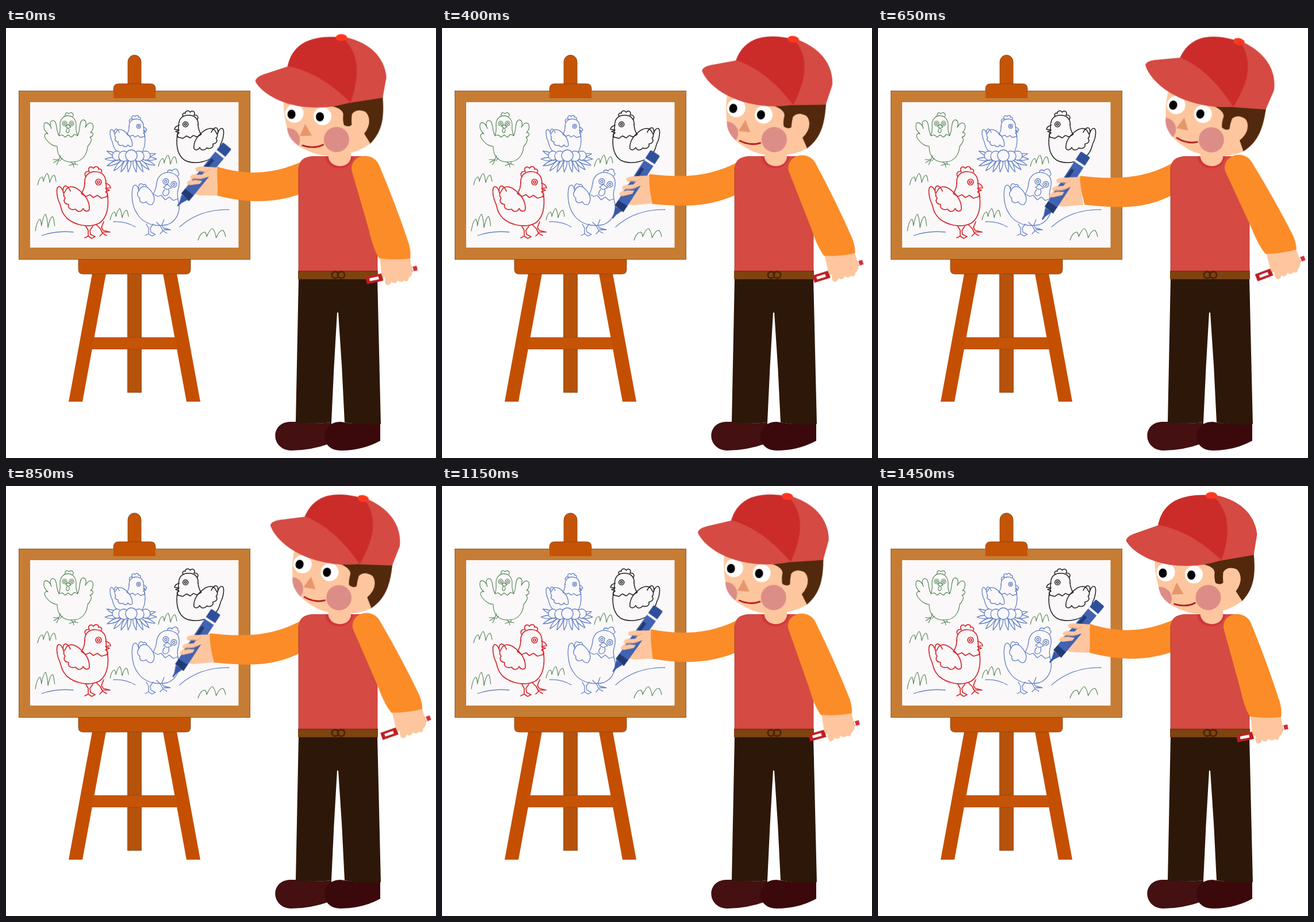
An HTML page without scripts for the animation above (1500 ms loop, 748x748 px).

```html
<!DOCTYPE html>
<html lang="en">
<head>
<meta charset="utf-8">
<title>Painter at the easel</title>
<style>
html, body { margin: 0; height: 100%; overflow: hidden; background: #fff; }
svg { display: block; width: 100%; height: 100%; }

/* All parts share one back-and-forth beat of fifteen even steps each way. */
.swing, .drawing-hand, .sleeve { animation: swing 1.5s steps(15) -50ms infinite; }
.head { --turn: 15deg; transform-origin: 575px 216px; }
.resting-arm { --turn: -10deg; transform-origin: 612px 230px; }
/* The drawing arm follows an arc: nine steps down, then six steps across. */
.drawing-hand { animation-name: draw; transform-origin: 298px 307px; }
.sleeve { animation-name: reach; }

@keyframes swing {
  0%, 100% { transform: rotate(0deg); }
  50% { transform: rotate(var(--turn)); }
}
@keyframes draw {
  0%, 100% { transform: translate(0px, 0px) rotate(0deg); animation-timing-function: steps(9); }
  30% { transform: translate(-2px, 24px) rotate(-7deg); animation-timing-function: steps(6); }
  50% { transform: translate(-15px, 26.5px) rotate(-6.5deg); animation-timing-function: steps(6); }
  70% { transform: translate(-2px, 24px) rotate(-7deg); animation-timing-function: steps(9); }
}
@keyframes reach {
  0%, 100% {
    d: path("M369 240C420 256 465 255 520 230L520 286C470 304 425 305 368 290C370 272 367 258 369 240Z");
    animation-timing-function: steps(9);
  }
  30%, 70% { d: path("M361 254C410 260 465 262 520 230L520 286C470 311 425 312 366 306C363 290 359 272 361 254Z"); }
  30%, 50% { animation-timing-function: steps(6); }
  50% { d: path("M349 258C405 264 465 266 520 230L520 286C470 316 425 315 358 308C354 292 349 276 349 258Z"); }
  70% { animation-timing-function: steps(9); }
}

.line { fill: none; stroke-width: 1.3; stroke-linecap: round; stroke-linejoin: round; }
.line *, #hen *, #tuft, #straw { vector-effect: non-scaling-stroke; }
.green { stroke: #4e8150; stroke-width: 1.1; }
.blue { stroke: #6481c3; }
.red { stroke: #d32b31; stroke-width: 1.7; }
.black { stroke: #222; stroke-width: 1.5; }
.skin { fill: #fdc69e; }
.cloth { fill: #d54a43; }
.orange { fill: #fb8c28; }
.wood { fill: #c55407; }
.edge { stroke: #7d4312; stroke-width: .8; }
</style>
</head>
<body>
<svg viewBox="0 0 748 748">
  <defs>
    <g id="hen">
      <path d="M137 270C136 256 145 249 157 250C169 251 174 259 174 271Q174 282 177 293C179 315 175 330 163 339C145 349 120 343 106 331C94 319 97 310 92 302C89 295 87 281 90 277C94 273 99 281 100 287C98 279 101 273 105 275Q110 278 112 284"/>
      <path d="M137 268Q137 280 131 288L139 293L146 290L152 295L159 291L166 296L177 293"/>
      <path d="M103 284C107 274 116 275 123 279C136 288 146 301 145 316C142 321 136 318 134 314C131 321 124 320 121 315C113 318 107 313 109 307C102 306 99 301 103 296C99 292 100 287 103 284"/>
      <path d="M139 259C135 253 139 248 145 250C141 243 148 239 152 244C155 239 162 241 161 246C166 244 168 249 165 252"/>
      <path d="M173 270Q181 272 182 278L173 279M174 280L180 282L173 285Q180 289 175 293"/>
      <circle cx="161" cy="268" r="5"/><circle cx="161" cy="268" r="2"/>
    </g>
    <g id="feet">
      <path d="M139 345L143 352V362L137 365M143 362L149 366L155 363L147 359L146 352L151 345M157 342L164 349L168 357L163 362M168 357L175 361M169 355L181 355L169 352L166 347L170 337"/>
    </g>
    <path id="tuft" d="M0 20Q3 6 8 6Q10 9 10 14Q14 0 17 0Q20 5 21 16Q25 2 29 3Q31 6 32 14"/>
    <path id="straw" d="M0 0Q10 -6 26 0Q10 6 0 0Z"/>
    <clipPath id="face-clip"><use href="#face"/></clipPath>
  </defs>

  <g id="easel">
    <path fill="#c44f00" d="M150 427H174L133 650H109ZM273 427H297L338 650H314Z"/>
    <rect class="edge" x="211.500" y="427" width="24" height="207" fill="#b5530d"/>
    <path class="wood" d="M153 538H294L298 559H149Z"/>
    <path d="M212 538H236M212 559H236" stroke="#9d4710"/>
    <path class="wood edge" d="M126 402H321V420Q321 428 313 428H134Q126 428 126 420Z"/>
    <path class="wood edge" d="M212 110V59A11.500 12 0 0 1 235 59V110Z"/>
    <rect class="edge" x="22.500" y="109.500" width="402" height="293" fill="#c77c33"/>
    <path class="wood" d="M187 122V106Q187 97 196 97H251Q260 97 260 106V122Z"/>
    <path class="edge" fill="none" d="M187 109V106Q187 97 196 97H251Q260 97 260 106V109"/>
    <rect x="42" y="129" width="362.500" height="253" fill="#fbf8f9"/>
  </g>

  <g class="line green">
    <path d="M93 188C86 180 90 162 82 161C76 161 76 168 79 175C75 163 66 162 66 169C65 176 69 181 73 184C66 182 66 189 70 194C77 203 82 205 89 206C89 224 99 234 116 233C133 233 141 220 142 206C147 201 151 193 146 190C153 188 153 181 147 182C153 176 153 166 147 165C142 165 141 169 138 173C141 164 138 159 133 160C126 164 130 180 124 188"/>
    <path d="M92 187Q95 180 94 168C94 148 121 147 122 168Q121 181 125 187L119 185L114 190L108 186L103 190L98 186Z"/>
    <path d="M103 153C102 147 107 146 109 149C115 145 119 150 116 154M104 171L108 168L113 172L108 175ZM106 175C102 184 111 185 110 176"/>
    <circle cx="102" cy="166" r="4"/><circle cx="102" cy="166" r="1.700"/>
    <circle cx="114" cy="166" r="4"/><circle cx="114" cy="166" r="1.700"/>
    <path d="M95 222L92 229L82 229M92 229L83 234M92 230L88 238M98 226L94 231M113 233L117 237L110 239M117 237L118 242M117 236L125 238M120 233V237"/>
    <use href="#tuft" x="55" y="253"/>
    <use href="#tuft" x="265" y="221"/>
    <use href="#tuft" transform="translate(51 324)scale(1.050 1.450)"/>
    <use href="#tuft" x="181" y="314"/>
    <use href="#tuft" transform="translate(334 349)scale(1.500 1)"/>
  </g>

  <g class="line blue">
    <use href="#hen" transform="matrix(.684 0 0 .7 120.500 -16.700)"/>
    <g fill="#fbf8f9">
      <use href="#straw" transform="translate(199 225)rotate(205)"/>
      <use href="#straw" transform="translate(198 228)rotate(180)"/>
      <use href="#straw" transform="translate(200 230)rotate(158)"/>
      <use href="#straw" transform="translate(205 229)rotate(132)"/>
      <use href="#straw" transform="translate(211 227)rotate(115)"/>
      <use href="#straw" transform="translate(216 225)rotate(98)"/>
      <use href="#straw" transform="translate(222 225)rotate(80)"/>
      <use href="#straw" transform="translate(227 227)rotate(64)"/>
      <use href="#straw" transform="translate(231 228)rotate(46)"/>
      <use href="#straw" transform="translate(235 229)rotate(22)"/>
      <use href="#straw" transform="translate(236 227)rotate(2)"/>
      <use href="#straw" transform="translate(235 225)rotate(-14)"/>
      <circle cx="193" cy="222" r="8"/><circle cx="243" cy="222" r="8"/>
      <circle cx="205" cy="223" r="9"/><circle cx="231" cy="223" r="9"/>
      <circle cx="218" cy="222" r="10"/>
    </g>
    <path d="M62 361Q88 352 117 355M187 337Q208 336 225 346M302 346Q337 315 388 316"/>
    <path d="M262 270C264 255 276 249 288 252C302 256 303 267 300 279Q296 290 301 306C303 324 294 337 281 342C259 347 238 340 228 323C218 309 218 285 221 276C226 269 230 277 231 283C229 272 234 268 239 273Q243 270 245 276"/>
    <path d="M262 270Q261 281 256 289L264 293L270 291L277 299L284 294L291 300L299 297"/>
    <path d="M231 283C235 274 243 274 248 279C258 288 261 300 254 307C247 309 245 304 244 302C237 307 231 302 233 296C227 292 228 287 231 283"/>
    <path d="M281 251C281 245 288 247 289 249C292 243 300 245 299 251Q303 253 299 257M274 277L281 272L288 278L280 281ZM276 281C269 289 275 294 280 291Q285 288 283 281"/>
    <circle cx="278" cy="267" r="5"/><circle cx="278" cy="267" r="2"/>
    <circle cx="292" cy="272" r="5"/><circle cx="292" cy="272" r="2"/>
    <use href="#feet" transform="translate(105 -4)"/>
  </g>
  <g class="line black"><use href="#hen" transform="matrix(-.916 0 0 .875 459.700 -66.900)"/></g>
  <g class="line red"><use href="#hen"/><use href="#feet"/></g>

  <g class="drawing-hand">
    <path class="skin" d="M372 240L345 239Q328 239 331 245L346 249L325 253Q318 257 324 260L318 264Q312 269 321 271L336 272L326 281Q325 287 338 289L372 290Z"/>
    <g transform="translate(386 203)rotate(130)">
      <path fill="#4262b2" d="M2 -10H106V9H2Q0 9 0 7V-8Q0 -10 2 -10Z"/>
      <path fill="#304f9b" d="M2 -10H17V9H2Q0 9 0 7V-8Q0 -10 2 -10Z"/>
      <path fill="#fff" d="M17 -10H21V9H17Z"/>
      <path fill="#233b75" d="M34 1H58V7H34ZM104 -10H117L115 9H104Z"/>
      <path fill="#3558a8" d="M116 -7L128 -2L136 -1V1L128 2L116 7Z"/>
    </g>
    <path class="skin" d="M370 241L345 239Q328 238 331 245L347 248L342 253L326 253Q319 256 324 259L339 260L353 257Q363 253 370 247Z"/>
    <path class="skin" d="M318 264Q312 269 321 271L338 269L342 264L330 262Z"/>
    <path d="M332 246L347 249L356 244M324 260L340 261L349 258" fill="none" stroke="#e9a27c" stroke-width="1"/>
  </g>
  <path class="sleeve orange" d="M369 240C420 256 465 255 520 230L520 286C470 304 425 305 368 290C370 272 367 258 369 240Z"/>

  <g id="body">
    <path fill="#441011" d="M506 685Q535 690 566 686V722Q530 735 496 735C460 734 459 686 494 685Z"/>
    <path fill="#3b090b" d="M582 685Q620 692 651 687V718Q620 735 582 735C544 735 545 685 582 685Z"/>
    <path fill="#2d1708" d="M509 436H646L652 689Q620 692 589 686Q585 590 578 495H576Q570 590 566 686Q535 690 504 686Z"/>
    <path class="cloth" d="M509 424V242Q511 225 532 223H625L646 300V424Z"/>
    <path d="M509 424V242M646 300V424" stroke="#9f3430" stroke-width=".7"/>
    <rect x="508" y="423" width="139" height="14" fill="#7e4410"/>
    <path d="M508 423H647" stroke="#522909"/>
    <g fill="none" stroke="#4c2506" stroke-width="3">
      <rect x="567" y="424" width="11" height="11" rx="5"/>
      <rect x="577" y="424" width="12" height="11" rx="5"/>
    </g>
    <path fill="#d2363a" d="M555 223C557 251 602 251 604 223Z"/>
    <path class="skin" d="M560 208H600V226C596 245 566 245 561 226Z"/>
  </g>

  <g class="swing head">
    <g transform="translate(.5 -1)">
      <path fill="#52290c" d="M570 132L653 117C656 150 656 178 632 202L598 180Z"/>
      <path id="face" class="skin" d="M481 125Q480 150 488 178C491 201 516 214 540 221Q560 226 585 221Q614 216 633 201L622 184Q632 171 630 158Q627 143 613 143L590 118Z"/>
      <path fill="#52290c" d="M558 136L625 122V146Q607 139 600 151Q599 160 600 169Q596 174 587 170Q584 164 585 150Q582 139 558 136Z"/>
      <g clip-path="url(#face-clip)">
        <circle cx="490" cy="197" r="20.500" fill="#dd8d87"/>
        <circle cx="500" cy="151" r="16" fill="#fff"/>
      </g>
      <circle cx="549" cy="155" r="15.500" fill="#fff"/>
      <ellipse cx="495" cy="152.500" rx="7" ry="8"/>
      <ellipse cx="544.500" cy="156" rx="7" ry="8"/>
      <path fill="#e6966d" d="M519 169L510 190L531 189Z"/>
      <circle cx="574" cy="195" r="22" fill="#dd8d87"/>
      <path d="M514 206Q535 213 552 204" fill="none" stroke="#b3161a" stroke-width="2.600"/>
      <path class="cloth" d="M576 15C628 22 655 50 659 85L653 121L595 131L570 80Z"/>
      <path fill="#cb2c2a" d="M486 72C493 28 528 13 581 17C615 47 611 88 597 131L540 110Z"/>
      <path class="cloth" d="M431 96Q432 89 445 84L488 69C532 77 567 102 597 130C555 144 512 142 482 132C460 125 438 110 431 96Z"/>
      <ellipse cx="579.500" cy="17.500" rx="10" ry="6" fill="#fe3820"/>
    </g>
  </g>

  <g class="swing resting-arm">
    <g transform="translate(623 433)rotate(-11.500)">
      <rect width="29" height="13" fill="#bd1e23"/>
      <rect x="6" y="4" width="16" height="5" fill="#fff"/>
      <path fill="#cf3033" d="M76 0H91V8H76Z"/>
      <path fill="#fff" d="M82 0H84V8H82Z"/>
    </g>
    <path class="skin" d="M648 396L651 430Q654 437 657 434Q655 447 661 448Q667 447 668 442Q674 448 679 440Q686 445 690 440Q696 445 698 436Q706 431 704 421L700 396Z"/>
    <path class="orange" d="M601 247C599 220 638 213 649 239Q678 310 699 376Q703 392 701 402Q674 405 647 401Q637 385 630 352Z"/>
  </g>
</svg>
</body>
</html>
```
